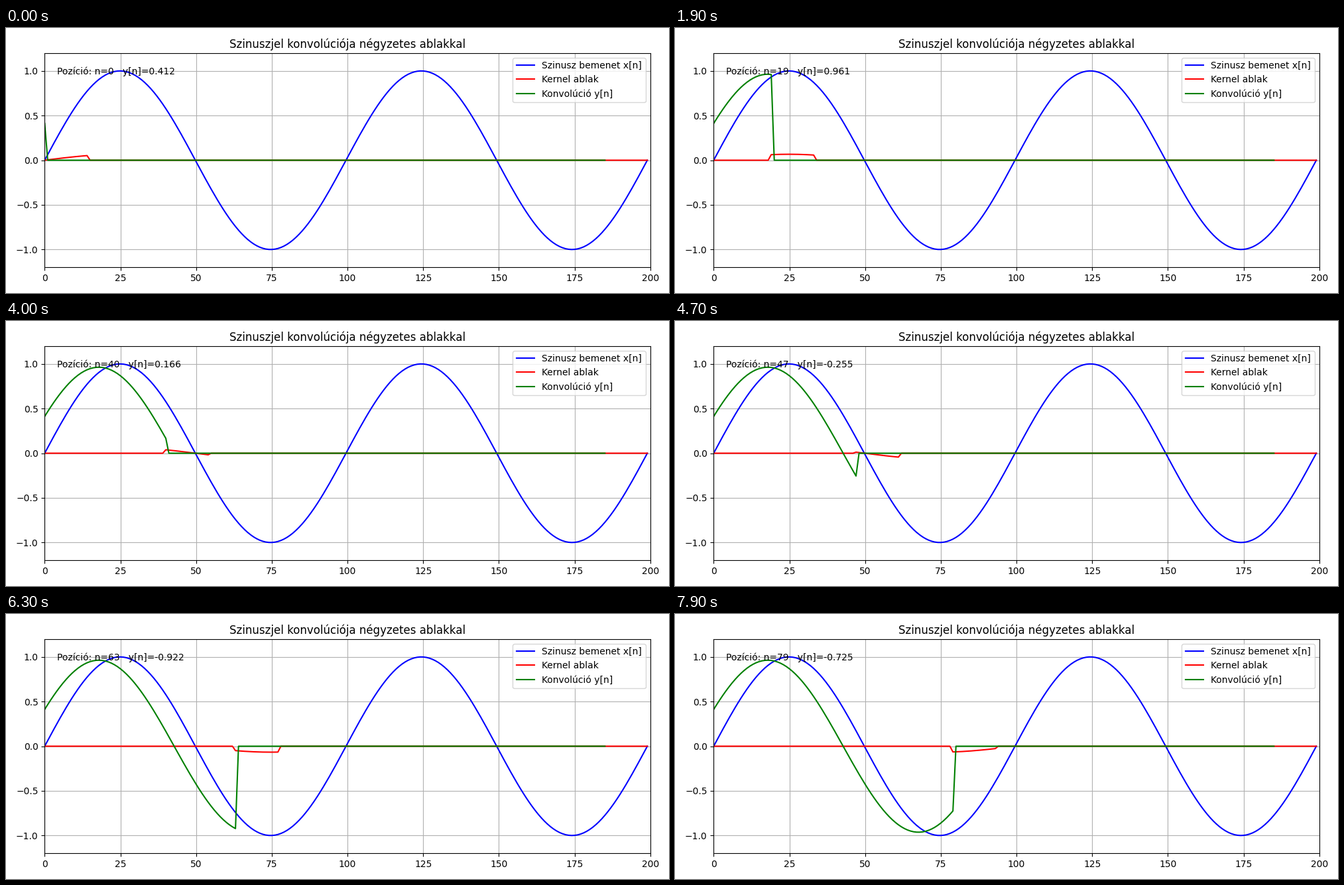
Recreate the animation shown at these times as a matplotlib script. Size 1000 by 400 pixels, loop 8 s.

```python
import numpy as np
import matplotlib.pyplot as plt
from matplotlib.animation import FuncAnimation

SAMPLES = 200
WIDTH = 15
FRAMES = 80
INTERVAL = 100

plt.rcParams["font.family"] = "DejaVu Sans"

n = np.arange(SAMPLES)
x = np.sin(np.linspace(0, 4 * np.pi, SAMPLES))
kernel = np.ones(WIDTH) / WIDTH
y = np.convolve(x, kernel, mode="valid")

fig, ax = plt.subplots(figsize=(10, 4), dpi=100)
ax.plot(n, x, color="blue", label="Szinusz bemenet x[n]")
window_line, = ax.plot(n, np.zeros(SAMPLES), color="red", label="Kernel ablak")
result_line, = ax.plot(n[:len(y)], np.zeros(len(y)), color="green",
                       label="Konvolúció y[n]")
info = ax.text(0.02, 0.9, "", transform=ax.transAxes)

ax.set_xlim(0, SAMPLES)
ax.set_ylim(-1.2, 1.2)
ax.set_title("Szinuszjel konvolúciója négyzetes ablakkal")
ax.legend(loc="upper right")
ax.grid(True)
fig.tight_layout()


def update(pos):
    window = np.zeros(SAMPLES)
    window[pos:pos + WIDTH] = x[pos:pos + WIDTH] * kernel
    window_line.set_ydata(window)
    result_line.set_ydata(np.where(n[:len(y)] <= pos, y, 0))
    info.set_text(f"Pozíció: n={pos}   y[n]={y[pos]:.3f}")
    return window_line, result_line, info


anim = FuncAnimation(fig, update, frames=FRAMES, interval=INTERVAL,
                     init_func=lambda: update(0), repeat=True)
plt.show()
```
